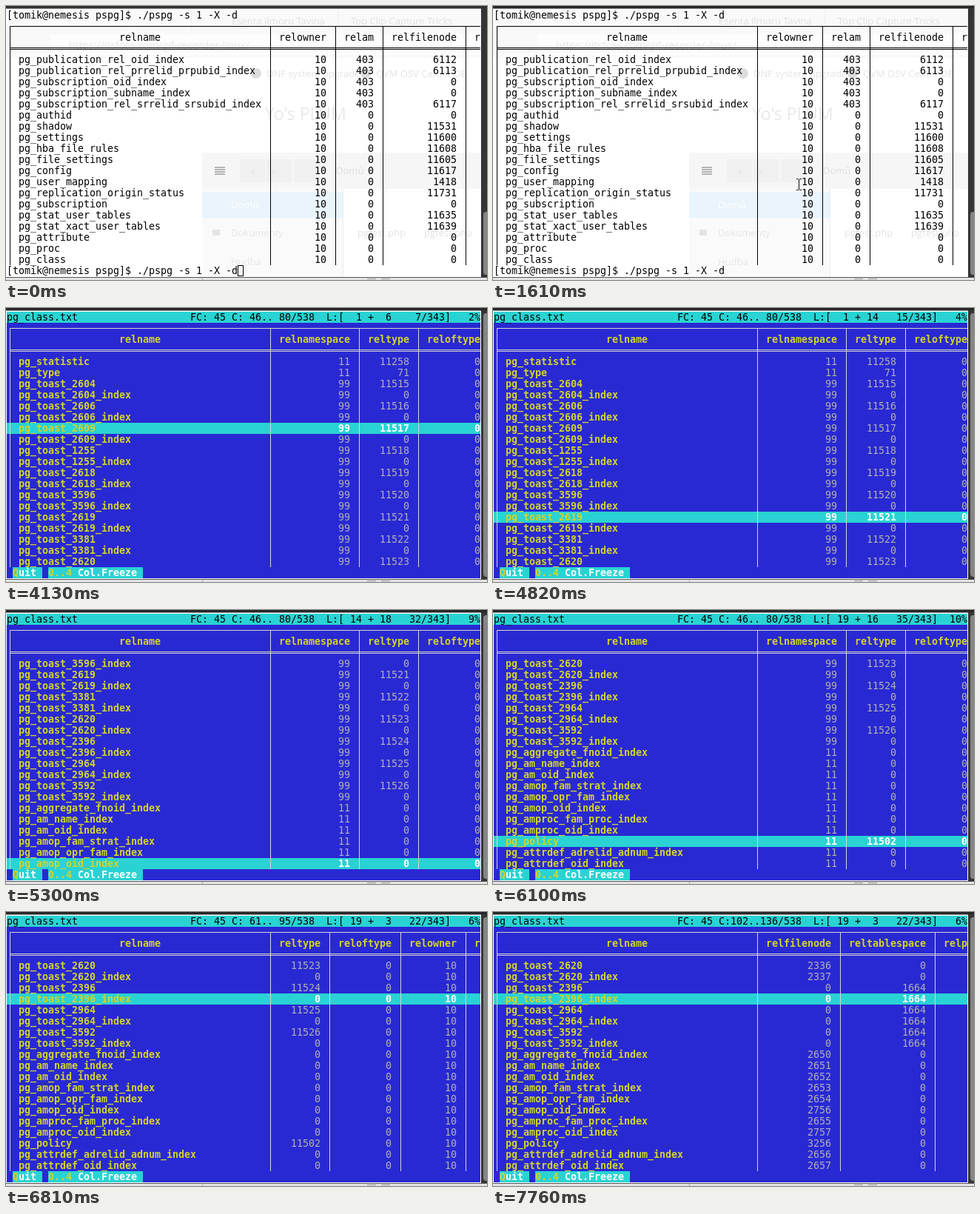
An HTML page with a canvas that plays this animation: 650x370 px, repeating every 7.99 s.

```html
<!DOCTYPE html>
<html>
<head>
<meta charset="utf-8">
<style>
html, body { margin: 0; width: 100%; height: 100%; overflow: hidden; background: #fff; }
canvas { display: block; }
</style>
</head>
<body>
<canvas width="650" height="370"></canvas>
<script>
const ctx = document.querySelector('canvas').getContext('2d');
const LOOP = 7990, CELL_W = 8, CELL_H = 15, FROZEN = 45, PAGE = 19, TOTAL = 343;
const PROMPT = '[tomik@nemesis pspg]$ ./pspg -s 1 -X -d';
const BLUE = '#2929d3', CYAN = '#29d3d3', YELLOW = '#d3d329';
const COLUMNS = ['relnamespace', 'reltype', 'reloftype', 'relowner', 'relam',
  'relfilenode', 'reltablespace', 'relpages'];
const ROW_KEYS = [3260, 3490, 3630, 3800, 3960, 4130];
const COLUMN_KEYS = [6810, 7140, 7320, 7530, 7760];

// Table contents: [name, ...values in column order]
const makeRow = (name, space, type, node, tablespace = 0) =>
  [name, space, type, 0, 10, name.endsWith('_index') ? 403 : 0, node, tablespace, 0];

const toast = '2604 2606 2609 1255 2618 3596 2619 3381 2620 2396 2964 3592'.split(' ');
const catalog = [
  makeRow('pg_statistic', 11, 11258, 2619),
  makeRow('pg_type', 11, 71, 0),
  ...toast.flatMap((id, i) => ['', '_index'].map((end, j) =>
    makeRow('pg_toast_' + id + end, 99, end ? 0 : 11515 + i, i === 8 ? 2336 + j : 0, i > 8 ? 1664 : 0))),
  ...('aggregate_fnoid_index:2650 am_name_index:2651 am_oid_index:2652 amop_fam_strat_index:2653 ' +
    'amop_opr_fam_index:2654 amop_oid_index:2756 amproc_fam_proc_index:2655 amproc_oid_index:2757 ' +
    'policy:3256 attrdef_adrelid_adnum_index:2656 attrdef_oid_index:2657').split(' ').map(item => {
    const [name, node] = item.split(':');
    return makeRow('pg_' + name, 11, name === 'policy' ? 11502 : 0, node);
  }),
];
const shellRows = ('publication_rel_oid_index:6112 publication_rel_prrelid_prpubid_index:6113 ' +
  'subscription_oid_index:0 subscription_subname_index:0 subscription_rel_srrelid_srsubid_index:6117 ' +
  'authid:0 shadow:11531 settings:11600 hba_file_rules:11608 file_settings:11605 config:11617 ' +
  'user_mapping:1418 replication_origin_status:11731 subscription:0 stat_user_tables:11635 ' +
  'stat_xact_user_tables:11639 attribute:0 proc:0 class:0').split(' ').map(item => {
  const [name, node] = item.split(':');
  return makeRow('pg_' + name, 11, 0, node);
});

const columnsWidth = count => COLUMNS.slice(0, count).reduce((sum, name) => sum + name.length + 3, 0);
const pad = (value, width) => String(value).padStart(width);
const passed = (times, t) => times.filter(x => t >= x).length;
const repeats = (t, start, max) =>
  Math.floor(1.43 * Math.max(0, Math.min(max, Math.floor((t - start) / 40) + 1)));

function rect(color, x, y, w, h) {
  ctx.fillStyle = color;
  ctx.fillRect(x, y, w, h);
}

function cells(color, col, row, count) {
  rect(color, 1 + col * CELL_W, 5 + row * CELL_H, count * CELL_W, CELL_H);
}

function print(text, col, row, color, bold) {
  ctx.font = (bold ? 'bold ' : '') + '13.33px "DejaVu Sans Mono", monospace';
  ctx.fillStyle = color;
  [...text].forEach((char, i) => {
    if (char !== ' ') ctx.fillText(char, 1 + (col + i) * CELL_W, 17 + row * CELL_H);
  });
}

function label(text, x, y, size, color) {
  ctx.font = size + 'px "Open Sans", sans-serif';
  ctx.fillStyle = color;
  ctx.fillText(text, x, y);
}

function clipped(x, y, w, h, paint) {
  ctx.save();
  ctx.beginPath();
  ctx.rect(x, y, w, h);
  ctx.clip();
  paint();
  ctx.restore();
}

// Faint windows showing through the terminal
function drawBackdrop() {
  rect('#f9f9f9', 0, 4, 642, 66);
  rect('#fdfdfd', 60, 38, 582, 28);
  rect('#eeeeee', 250, 6, 1, 30);
  rect('#eeeeee', 448, 6, 1, 30);
  label('Esenta Ilmoru Tavina', 305, 25, 13, '#e0e0e0');
  label('Top Clip Capture Tricks', 466, 25, 13, '#e0e0e0');
  label('https://itsfoss.com/gif-recorder-linux/', 85, 58, 14, '#e8e8e8');
  label('DNF system upgrade', 352, 96, 13, '#e4e4e4');
  label('QVM OSV Center DE', 500, 96, 13, '#e4e4e4');
  ctx.fillStyle = '#dcdcdc';
  for (const x of [338, 486]) {
    ctx.beginPath();
    ctx.arc(x, 91, 7, 0, 7);
    ctx.fill();
  }
  label("Yo's PLUM", 350, 154, 23, '#e9e9e9');

  rect('#f6f6f6', 265, 198, 377, 49);
  rect('#fafafa', 265, 247, 190, 119);
  rect('#e9f4fc', 265, 251, 190, 35);
  rect('#ececec', 455, 247, 1, 119);
  for (let i = 0; i < 4; i++) rect('#b4b4b4', 282, 217 + i * 3, 14, 2);
  for (const x of [316, 352, 390]) rect('#f0f0f0', x, 207, 34, 31);
  label('‹     ›', 331, 228, 17, '#e2e2e2');
  label('Domů', 446, 227, 13, '#dedede');
  label('Domů', 304, 273, 13, '#ffffff');
  label('Dokumenty', 304, 311, 13, '#e6e6e6');
  label('Hudba', 304, 350, 13, '#e6e6e6');
  label('pgtest.php', 475, 311, 13, '#e2e2e2');
  label('pgtest.php', 565, 311, 13, '#e2e2e2');
  for (const x of [279, 279, 279]) rect('#e4e4e4', x, 302, 10, 8);
}

function drawChrome(focused, fullSlider) {
  rect(focused ? '#272727' : '#303030', 0, 0, 650, 3);
  rect('#8a8a8a', 0, 3, 642, 1);
  rect('#353535', 642, 3, 8, 363);
  const top = fullSlider ? 7 : 278;
  ctx.fillStyle = '#858585';
  ctx.beginPath();
  ctx.roundRect(645, top, 9, 363 - top, 4);
  ctx.fill();
  rect('#555555', 0, 366, 650, 1);
  rect('#e4e4e4', 0, 367, 650, 3);
  rect('#b0b0b0', 265, 367, 1, 3);
  rect('#999999', 488, 368, 12, 1);
  rect('#999999', 507, 368, 12, 1);
}

function drawTable(rows, offset, style, selected = -1) {
  const lineColor = style.line;
  const first = 4;
  if (selected >= 0) cells(CYAN, 0, first + selected, 80);
  for (const y of [27, 56, 58]) rect(lineColor, 5, y, 636, 1);
  for (const col of [0, FROZEN - 1]) rect(lineColor, 5 + col * CELL_W, 27, 1, 323);

  print('relname', 19, 2, style.head, style.bold);
  rows.forEach((row, i) => print(row[0], 2, first + i, style.head, style.bold));

  clipped(1 + FROZEN * CELL_W, 5, 640 - FROZEN * CELL_W, 360, () => {
    COLUMNS.forEach((name, c) => {
      const left = FROZEN + columnsWidth(c) - offset;
      const right = left + name.length + 2;
      if (right < FROZEN || left > 80) return;
      print(name, left + 1, 2, style.head, style.bold);
      rect(lineColor, 5 + right * CELL_W, 27, 1, 323);
      rows.forEach((row, i) => {
        const active = i === selected;
        print(pad(row[c + 1], name.length), left + 1, first + i, active ? '#fff' : style.text, active);
      });
    });
  });
}

function drawShell(t) {
  drawBackdrop();
  print(PROMPT, 0, 0, '#000');
  drawTable(shellRows, columnsWidth(3), { line: '#000', head: '#000', text: '#000' });
  print(PROMPT, 0, 23, '#000');
  if (t < 1030) {
    ctx.strokeStyle = '#000';
    ctx.strokeRect(313.5, 350.5, 7, 14);
  } else if (t < 1610 || t >= 2210) {
    cells('#000', 39, 23, 1);
  }
}

function drawPager(t) {
  const lowest = 1 + passed(ROW_KEYS, t) + repeats(t, 4620, 21);
  const current = lowest - passed([5640], t) - repeats(t, 6100, 10);
  const top = Math.max(1, lowest - PAGE + 1);
  const offset = columnsWidth(passed(COLUMN_KEYS, t));

  rect(BLUE, 1, 5, 640, 360);
  drawTable(catalog.slice(top - 1, top - 1 + PAGE), offset,
    { line: '#d3d3d3', head: YELLOW, text: '#b0b0b4', bold: true }, current - top);

  cells(CYAN, 0, 0, 80);
  print('pg_class.txt', 0, 0, '#000');
  print(`FC:${pad(FROZEN, 3)} C:${pad(46 + offset, 3)}..${pad(80 + offset, 3)}/538  ` +
    `L:[${pad(top, 3)} + ${pad(current - top, 2)}${pad(current, 5)}/${TOTAL}]` +
    `${pad(Math.floor(100 * current / TOTAL), 4)}%`, 31, 0, '#000');

  cells(CYAN, 1, 23, 5);
  cells(CYAN, 7, 23, 16);
  print('Q', 1, 23, YELLOW, true);
  print('uit', 2, 23, '#fff', true);
  print('0..4', 7, 23, YELLOW, true);
  print('Col.Freeze', 12, 23, '#fff', true);
}

function drawBeam(t) {
  const rest = 1 - Math.min(1, Math.floor((t - 610) / 40) / 7);
  const x = Math.round(413 + 122 * rest ** 1.5);
  const y = Math.round(241 + 81 * rest ** 1.5);
  const path = new Path2D(`M${x - 3} ${y - 7.5}h2.5l1 1l1-1h2.5M${x + 0.5} ${y - 7}v14` +
    `M${x - 3} ${y + 7.5}h2.5l1-1l1 1h2.5`);
  ctx.strokeStyle = '#fff';
  ctx.lineWidth = 3;
  ctx.stroke(path);
  ctx.strokeStyle = '#000';
  ctx.lineWidth = 1;
  ctx.stroke(path);
}

function drawArrow() {
  const path = new Path2D('M413.5 241.5v14l3.2-3l2.3 5.5l2.5-1l-2.3-5.3h4.3z');
  ctx.fillStyle = '#000';
  ctx.fill(path);
  ctx.strokeStyle = '#fff';
  ctx.lineWidth = 1;
  ctx.stroke(path);
}

function draw() {
  const t = performance.now() % LOOP;
  rect('#fff', 0, 0, 650, 370);
  if (t < 2300) drawShell(t);
  else if (t < 2340) cells('#000', 0, 0, 1);
  else drawPager(t);
  drawChrome(t >= 1030, t >= 2300);
  if (t >= 610 && t < 2340) drawBeam(t);
  else if (t >= 2340 && t < 3220) drawArrow();
  requestAnimationFrame(draw);
}
draw();
</script>
</body>
</html>
```
